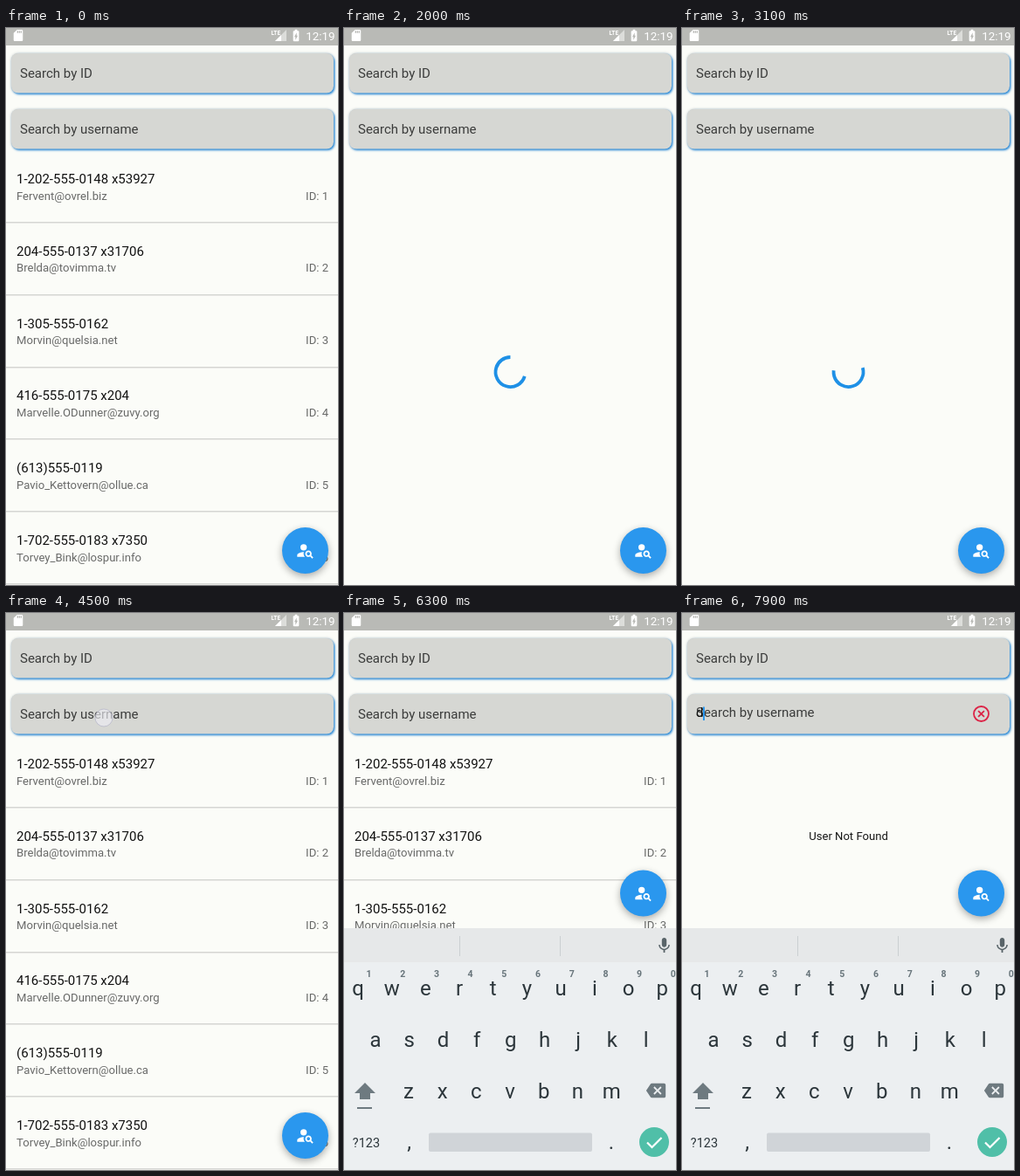
Animation of 380 by 638 pixels, one loop 8000 ms. Source, as an HTML page with a canvas:

```html
<!DOCTYPE html>
<html lang="en">
<head>
<meta charset="utf-8">
<title>User search</title>
<style>
  html, body { margin: 0; width: 100%; height: 100%; overflow: hidden; background: #fbfcf8; }
  canvas { display: block; width: 380px; height: 638px; }
</style>
</head>
<body>
<canvas id="stage" width="380" height="638"></canvas>
<script>
const ctx = document.getElementById('stage').getContext('2d');
const W = 380, H = 638, LOOP = 8000, STEP = 100;
const BG = '#fbfcf8', BLUE = '#2a97ee', BAR = '#b9bab6';
const KEYBOARD_TOP = 361, KEYBOARD_H = H - KEYBOARD_TOP;

const users = [
  ['1-202-555-0148 x53927', 'Fervent@ovrel.biz'],
  ['204-555-0137 x31706', 'Brelda@tovimma.tv'],
  ['1-305-555-0162', 'Morvin@quelsia.net'],
  ['416-555-0175 x204', 'Marvelle.ODunner@zuvy.org'],
  ['(613)555-0119', 'Pavio_Kettovern@ollue.ca'],
  ['1-702-555-0183 x7350', 'Torvey_Bink@lospur.info'],
];

// Each search: finger down, spinner start, result shown.
const searches = [
  { tap: 1400, start: 1535, end: 2100 },
  { tap: 2700, start: 2780, end: 3300 },
  { tap: 6800, start: 6870, end: 7300 },
];
const cursorOn = [[4600, 5100], [5700, 6200], [6800, 7300], [7900, 8000]];
const between = (t, [a, b]) => t >= a && t < b;

const icons = {
  person: new Path2D('M14 8a4 4 0 1 1-8 0a4 4 0 1 1 8 0zM10.35 14.01C7.62 13.91 2 15.27 2 18v2h9.54C9.07 17.24 10.31 14.11 10.35 14.01zM19.43 18.02C19.79 17.43 20 16.74 20 16c0-2.21-1.79-4-4-4s-4 1.79-4 4 1.79 4 4 4c.74 0 1.43-.22 2.02-.57L20.59 22 22 20.59zM16 18c-1.1 0-2-.9-2-2s.9-2 2-2 2 .9 2 2-.9 2-2 2z'),
  mic: new Path2D('M12 14c1.66 0 3-1.34 3-3V5c0-1.66-1.34-3-3-3S9 3.34 9 5v6c0 1.66 1.34 3 3 3zM17.3 11c0 3-2.54 5.1-5.3 5.1S6.7 14 6.7 11H5c0 3.41 2.72 6.23 6 6.72V21h2v-3.28c3.28-.48 6-3.3 6-6.72z'),
  backspace: new Path2D('M22 3H7c-.69 0-1.23.35-1.59.88L0 12l5.41 8.11c.36.53.9.89 1.59.89h15c1.1 0 2-.9 2-2V5c0-1.1-.9-2-2-2zm-3 12.59L17.59 17 14 13.41 10.41 17 9 15.59 12.59 12 9 8.41 10.41 7 14 10.59 17.59 7 19 8.41 15.41 12z'),
  sdCard: new Path2D('M18 2h-8L4 8v12c0 1.1.9 2 2 2h12c1.1 0 2-.9 2-2V4c0-1.1-.9-2-2-2zM12 8h-2V4h2zm3 0h-2V4h2zm3 0h-2V4h2z'),
  battery: new Path2D('M15.7 4H14V2h-4v2H8.3C7.6 4 7 4.6 7 5.3v15.4c0 .7.6 1.3 1.3 1.3h7.4c.7 0 1.3-.6 1.3-1.3V5.3c0-.7-.6-1.3-1.3-1.3zM11 20v-5.500H9L13 7v5.500h2z'),
};

function icon(name, cx, cy, scale, color) {
  ctx.save();
  ctx.translate(cx, cy);
  ctx.scale(scale, scale);
  ctx.translate(-12, -12);
  ctx.fillStyle = color;
  ctx.fill(icons[name], 'evenodd');
  ctx.restore();
}

function text(str, x, y, size, color, align = 'left', weight = 400) {
  ctx.font = `${weight} ${size}px Roboto, sans-serif`;
  ctx.textAlign = align;
  ctx.fillStyle = color;
  ctx.fillText(str, x, y);
}

function rect(x, y, w, h, color) {
  ctx.fillStyle = color;
  ctx.fillRect(x, y, w, h);
}

function roundRect(x, y, w, h, r, color) {
  ctx.beginPath();
  ctx.roundRect(x, y, w, h, r);
  ctx.fillStyle = color;
  ctx.fill();
}

function disc(x, y, r, color) {
  ctx.beginPath();
  ctx.arc(x, y, r, 0, Math.PI * 2);
  ctx.fillStyle = color;
  ctx.fill();
}

function polyline(points, color, width) {
  ctx.beginPath();
  points.forEach(([x, y]) => ctx.lineTo(x, y));
  ctx.strokeStyle = color;
  ctx.lineWidth = width;
  ctx.stroke();
}

function withShadow(color, blur, dx, dy, draw) {
  ctx.save();
  ctx.shadowColor = color;
  ctx.shadowBlur = blur;
  ctx.shadowOffsetX = dx;
  ctx.shadowOffsetY = dy;
  draw();
  ctx.restore();
}

function drawStatusBar() {
  rect(0, 0, W, 20, BAR);
  icon('sdCard', 14, 8.5, 0.66, '#fff');
  ctx.beginPath();
  ctx.moveTo(321, 2);
  ctx.lineTo(321, 15);
  ctx.lineTo(308, 15);
  ctx.fillStyle = '#dcddda';
  ctx.fill();
  ctx.beginPath();
  ctx.moveTo(315, 8);
  ctx.lineTo(315, 15);
  ctx.lineTo(308, 15);
  ctx.fillStyle = '#fff';
  ctx.fill();
  text('LTE', 303.5, 8, 6.5, '#fff', 'left', 700);
  icon('battery', 332, 8.5, 0.67, '#fff');
  text('12:19', 376.5, 13.5, 13.4, '#fff', 'right');
}

function drawField(y, label, labelY) {
  const box = () => roundRect(6, y, 369, 45.5, 8, '#d6d7d3');
  withShadow('rgba(110,120,125,.45)', 3, 0, 0, box);
  withShadow('#2186d8', 2.5, 1.3, 1.6, box);
  text(label, 16, labelY, 15, '#3b3c3b');
}

function drawCursor(x) {
  rect(x, 107.5, 2, 15.5, BLUE);
}

function drawClear() {
  const x = 342.5, y = 115.5, d = 3.4;
  ctx.beginPath();
  ctx.arc(x, y, 8.5, 0, Math.PI * 2);
  ctx.strokeStyle = '#dc2346';
  ctx.lineWidth = 1.8;
  ctx.stroke();
  polyline([[x - d, y - d], [x + d, y + d]], '#dc2346', 1.8);
  polyline([[x + d, y - d], [x - d, y + d]], '#dc2346', 1.8);
}

function drawList() {
  users.forEach(([phone, mail], i) => {
    const y = 82.8 * i;
    text(phone, 12, 178 + y, 15, '#111');
    text(mail, 12, 196.500 + y, 13.1, '#686968');
    text(`ID: ${i + 1}`, 369, 196.500 + y, 13.1, '#686968', 'right');
    rect(0, Math.round(222 + y), W, 1.5, '#d5d6d3');
  });
}

// Cubic ease (0.4, 0, 0.2, 1), solved by bisection.
function ease(x) {
  let lo = 0, hi = 1;
  for (let i = 0; i < 20; i++) {
    const s = (lo + hi) / 2, q = 1 - s;
    if (1.2 * q * q * s + 0.6 * q * s * s + s ** 3 < x) lo = s; else hi = s;
  }
  return lo * lo * (3 - 2 * lo);
}

function drawSpinner(age, cy) {
  const phase = (age / 1333) % 1;
  const head = ease(Math.min(1, phase * 2));
  const tail = ease(Math.max(0, phase * 2 - 1));
  const start = Math.PI * (-0.5 + 1.5 * tail + 2 * age / 2222 + 0.5 * phase);
  ctx.beginPath();
  ctx.arc(190.5, cy, 17, start, start + 1.5 * Math.PI * Math.max(head - tail, 0.001));
  ctx.strokeStyle = '#1e90e6';
  ctx.lineWidth = 3.8;
  ctx.stroke();
}

function drawPointer(x, y, alpha) {
  ctx.save();
  ctx.globalAlpha = alpha;
  disc(x, y, 10, 'rgba(236,236,243,.65)');
  ctx.strokeStyle = 'rgba(180,180,200,.7)';
  ctx.lineWidth = 1;
  ctx.stroke();
  ctx.restore();
}

function drawFab(y, t) {
  const x = 342.5;
  withShadow('rgba(0,0,0,.32)', 8, 0, 3, () => disc(x, y, 26.5, BLUE));
  const press = searches.find(s => between(t, [s.tap, s.tap + 400]));
  if (press) disc(x, y, 26.5, `rgba(255,255,255,${0.2 * (1 - (t - press.tap) / 400)})`);
  icon('person', x, y, 0.92, '#fff');
  if (press && t - press.tap < 100) drawPointer(x, y - 8, 1);
}

function drawKeyboard() {
  const ink = '#2c363b', pitch = 38.7;
  rect(0, 361, W, 39, '#e6e8e9');
  rect(0, 400, W, 238, '#eceff1');
  [132, 247].forEach(x => rect(x, 370, 1, 23, '#cbcfd1'));
  icon('mic', 366.5, 381, 0.9, '#596469');

  const row = (letters, x, y) =>
    [...letters].forEach((c, i) => text(c, x + i * pitch, y, 24, ink, 'center'));
  row('qwertyuiop', 16, 437.5);
  row('asdfghjkl', 36, 497);
  row('zxcvbnm', 74, 556);
  [...'1234567890'].forEach((c, i) =>
    text(c, 28.5 + i * pitch, 416.5, 10.5, '#68757b', 'center', 700));

  ctx.beginPath();
  [[24, 538], [36, 550], [30, 550], [30, 557], [18, 557], [18, 550], [12, 550]]
    .forEach(([x, y]) => ctx.lineTo(x, y));
  ctx.fillStyle = '#6e7a80';
  ctx.fill();
  rect(15, 566, 17, 2, '#6e7a80');
  icon('backspace', 357, 547, 0.93, '#6e7a80');

  text('?123', 25.5, 611.5, 14.5, ink, 'center');
  text(',', 74.5, 614, 24, ink, 'center');
  text('.', 306, 614, 24, ink, 'center');
  roundRect(97, 595.5, 187, 21.5, 2, '#d0d4d8');
  disc(355, 606, 17, '#50bfa8');
  polyline([[347, 606.5], [352.5, 612], [363.5, 601]], '#fff', 2.2);
}

function draw(t) {
  const resized = t >= 4800;
  const typed = t >= 7900;
  const search = searches.find(s => between(t, [s.start, s.end]));
  const bodyY = resized ? 255 : 394;

  rect(0, 0, W, H, BG);
  if (search) drawSpinner(t - search.start, bodyY - (resized ? 0.5 : 0));
  else if (t >= 7300) text('User Not Found', 190.5, 259.5, 13.1, '#161616', 'center');
  else drawList();

  drawStatusBar();
  drawField(29, 'Search by ID', 56.5);
  drawField(93, 'Search by username', typed ? 118.5 : 121);
  if (typed) {
    text('d', 16, 118.5, 15, '#111');
    drawClear();
  }
  if (cursorOn.some(span => between(t, span))) drawCursor(typed ? 24 : 16);
  if (between(t, [4500, 4700])) drawPointer(112, 120, t < 4600 ? 1 : 0.6);

  drawFab(resized ? 321 : 598.5, t);
  if (resized) {
    const left = Math.max(0, 1 - (t - 4700) / 300);
    ctx.save();
    ctx.translate(0, KEYBOARD_H * left * left);
    drawKeyboard();
    ctx.restore();
  }
}

const began = performance.now();
function tick() {
  const t = (performance.now() - began) % LOOP;
  draw(Math.floor(t / STEP) * STEP);
  requestAnimationFrame(tick);
}
tick();
</script>
</body>
</html>
```
